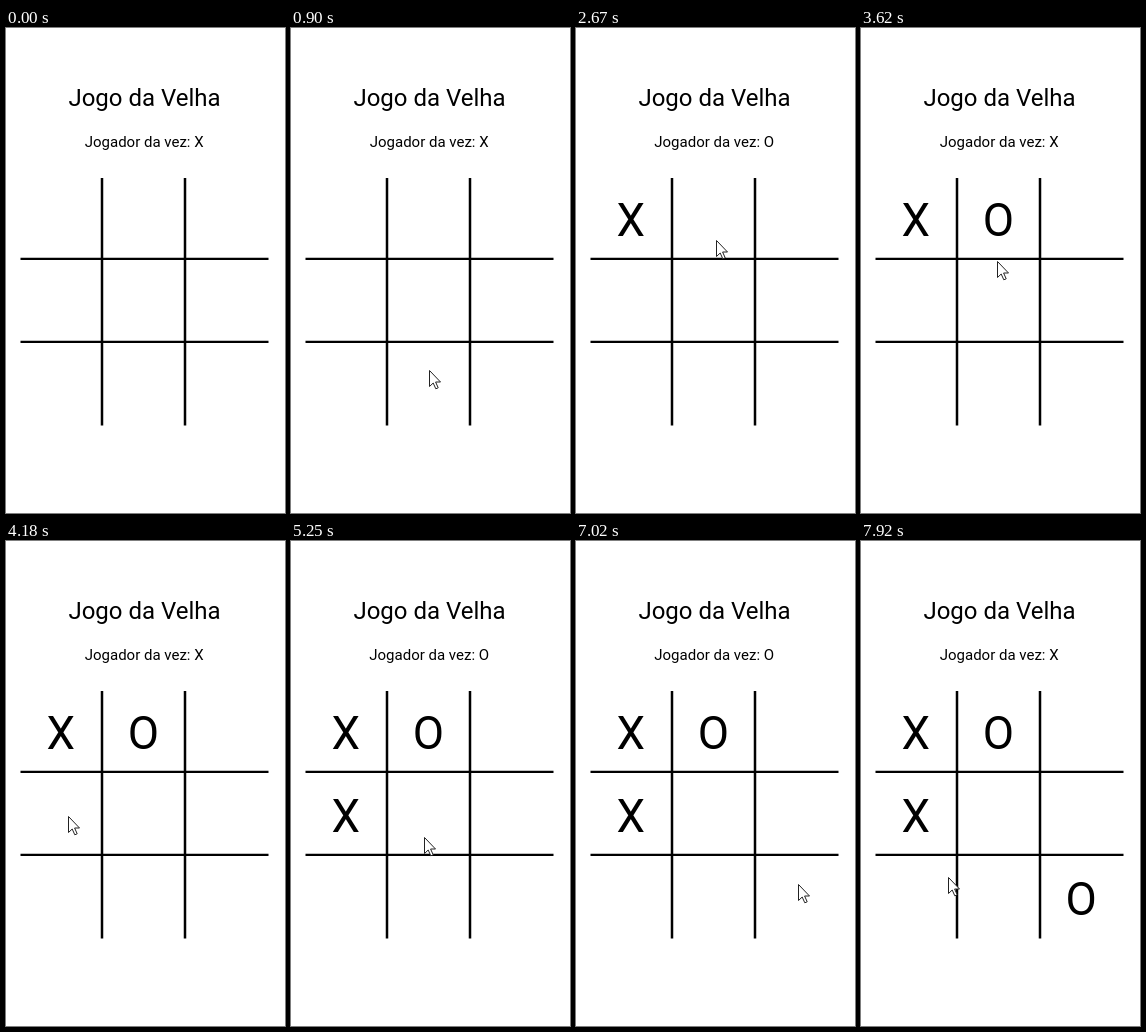
Recreate the animation shown at these times as an HTML page. Size 279 by 485 pixels, loop 7990 ms.

```html
<!DOCTYPE html>
<html lang="pt">
<head>
<meta charset="utf-8">
<title>Jogo da Velha</title>
<style>
  html, body { margin: 0; width: 100%; height: 100%; overflow: hidden; background: #fff; }
  svg { display: block; width: 279px; height: 485px; }
  text { font-family: Roboto, sans-serif; text-anchor: middle; fill: #000; }
</style>
</head>
<body>
<svg viewBox="0 0 279 485">
  <rect width="279" height="485" fill="#fff"/>
  <text x="138.5" y="78" font-size="24">Jogo da Velha</text>
  <text id="turn" x="138.2" y="118.7" font-size="15">Jogador da vez: X</text>
  <g stroke="#000">
    <path d="M96 150V397.5M179 150V397.5" stroke-width="2.5"/>
    <path d="M14.5 230.9H262.5M14.5 313.9H262.5" stroke-width="2.2"/>
  </g>
  <g id="marks" font-size="45.5"></g>
  <g id="cursor">
    <circle id="press" cx=".2" cy=".2" r="12" fill="#fcf873"/>
    <path d="M.5.5V16.5L4.2 13L6.8 18.8L9.2 17.8L6.6 12H11.5Z" fill="#fff" stroke="#222"/>
  </g>
</svg>
<script>
const LOOP = 7990, STEP = 70, APPEAR = 190;
const PRESS_ON = 200, PRESS_OFF = 70; // ms before a mark lands
const START = [230, 480];

const linear = k => k;
const smooth = k => k * k * (3 - 2 * k);
const out = k => 1 - (1 - k) ** 3;

const plays = [
  { at: 1840, col: 0, row: 0 },
  { at: 3410, col: 1, row: 0 },
  { at: 5110, col: 0, row: 1 },
  { at: 7290, col: 2, row: 2 }
];

// each glide bends towards "via" and begins where the one before ended
const glides = [
  { begin: 510, end: 1180, via: [150, 365], to: [46, 195], ease: smooth },
  { begin: 1970, end: 2670, via: [90, 228], to: [140, 212], ease: smooth },
  { begin: 3410, end: 4180, via: [135, 276], to: [62, 275], ease: smooth },
  { begin: 5110, end: 5670, via: [116, 288], to: [196, 318], ease: out },
  { begin: 5670, end: 6280, via: [210, 332], to: [222, 343], ease: smooth },
  { begin: 7290, end: 7920, via: [150, 318], to: [87, 336], ease: linear }
];

const $ = id => document.getElementById(id);
const player = n => 'XO'[n % 2];

function show(el, on) {
  el.setAttribute('visibility', on ? 'visible' : 'hidden');
}

plays.forEach((p, i) => {
  p.node = document.createElementNS('http://www.w3.org/2000/svg', 'text');
  p.node.setAttribute('x', 54.7 + 82.7 * p.col);
  p.node.setAttribute('y', 207.5 + 83 * p.row);
  p.node.textContent = player(i);
  $('marks').append(p.node);
});

// the pointer moves in even ticks on whole pixels
function pointer(t) {
  let pos = START;
  for (const { begin, end, via, to, ease } of glides) {
    if (t < begin) break;
    const tick = Math.floor((t - begin) / STEP + 1e-6) * STEP;
    const u = t >= end ? 1 : ease(tick / (end - begin));
    const v = 1 - u;
    pos = pos.map((a, i) => Math.round(a * v * v + 2 * via[i] * u * v + to[i] * u * u));
  }
  return pos;
}

function render(t) {
  const done = plays.filter(p => t >= p.at).length;
  plays.forEach((p, i) => show(p.node, i < done));
  $('turn').textContent = 'Jogador da vez: ' + player(done);

  $('cursor').setAttribute('display', t < APPEAR ? 'none' : 'inline');
  $('cursor').setAttribute('transform', `translate(${pointer(t)})`);
  show($('press'), plays.some(p => t >= p.at - PRESS_ON && t < p.at - PRESS_OFF));
}

const t0 = performance.now();
function frame() {
  render((performance.now() - t0) % LOOP);
  requestAnimationFrame(frame);
}
frame();
</script>
</body>
</html>
```
